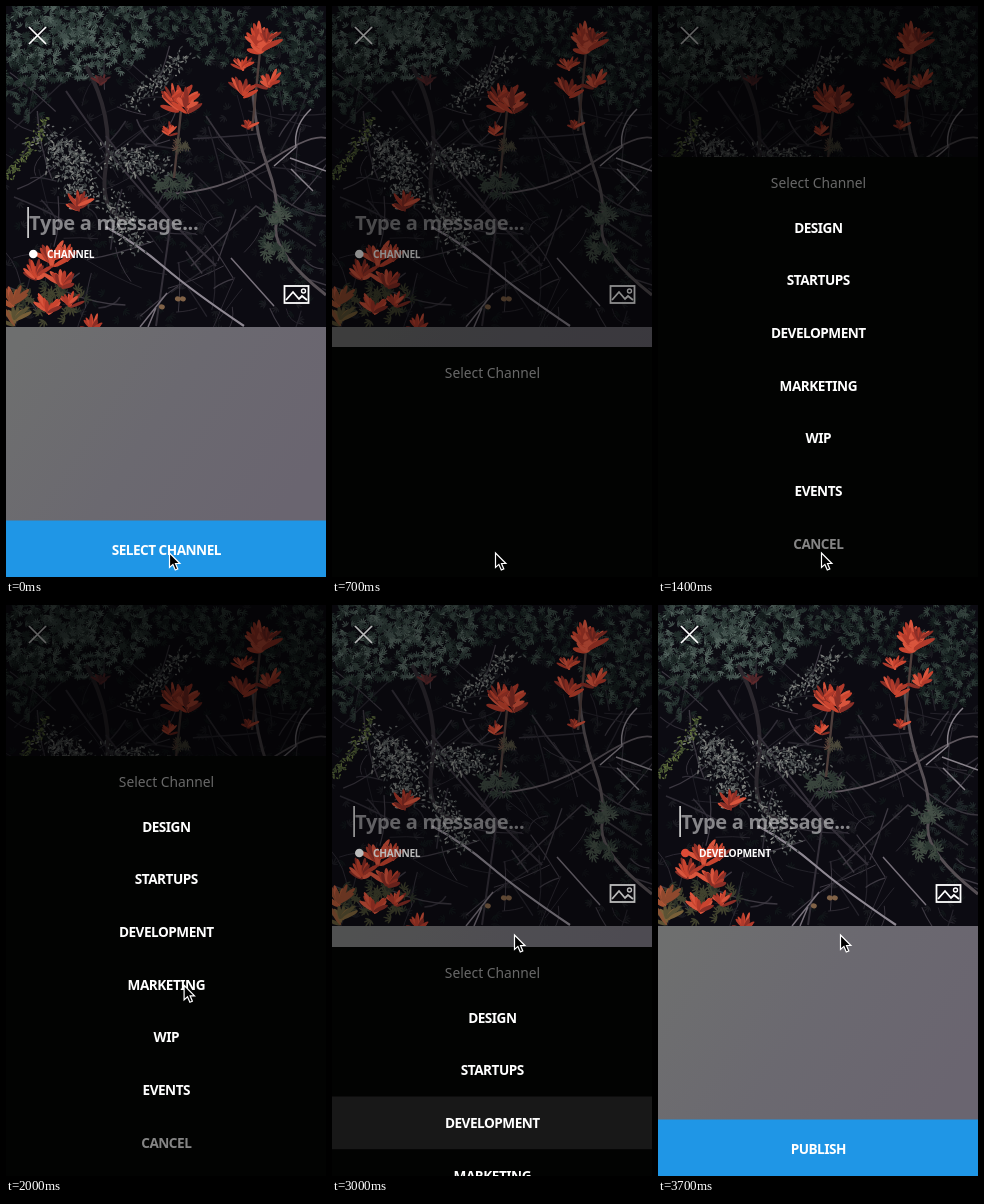
These frames come from a looping animation (320x571 px, 3.8 s). An HTML page with a canvas:

```html
<!DOCTYPE html>
<html lang="en">
<head>
<meta charset="utf-8">
<title>Select a channel</title>
<style>
  html, body { margin: 0; width: 100%; height: 100%; overflow: hidden; background: #000; }
  canvas, svg { position: absolute; left: 0; top: 0; display: block; }
  text { font-family: "Noto Sans", "Open Sans", sans-serif; fill: #fff; }
  .mid { text-anchor: middle; }
  .caps { font-weight: 600; font-size: 13.6px; letter-spacing: -.5px; }
  .small { font-weight: 600; font-size: 10.2px; letter-spacing: -.3px; }
  .hint { font-weight: 600; font-size: 20px; letter-spacing: -.3px; fill-opacity: .5; }
  .title { font-size: 13.8px; fill: #686868; }
  .line { fill: none; stroke: #fff; }
</style>
</head>
<body>
<canvas id="photo" width="320" height="321"></canvas>
<svg width="320" height="571" viewBox="0 0 320 571">
  <defs>
    <linearGradient id="haze" x1="0" y1=".2" x2="1" y2=".6">
      <stop offset="0" stop-color="#6e6f6f"/>
      <stop offset=".5" stop-color="#6b6970"/>
      <stop offset="1" stop-color="#6a6570"/>
    </linearGradient>
  </defs>

  <rect y="321" width="320" height="194" fill="url(#haze)"/>
  <path class="line" stroke-width="1.7" d="M23 21L40 38M40 21L23 38"/>
  <rect id="caret" x="21.3" y="201" width="1.6" height="31" fill="#ddd"/>
  <text class="hint" x="23" y="224">Type a message...</text>
  <circle id="dot" cx="27.3" cy="248" r="4.3"/>
  <text id="tag" class="small" x="41" y="251.6"></text>
  <g class="line" stroke-width="1.8">
    <rect x="278.5" y="280" width="24" height="17"/>
    <path d="M280 294l7-8 6 7 3-3 5 4"/>
    <circle cx="297.5" cy="285" r="2" stroke-width="1.4"/>
  </g>
  <rect y="514.5" width="320" height="56.5" fill="#1f96e6"/>
  <text id="action" class="caps mid" x="160.3" y="548.6"></text>

  <rect id="shade" width="320" height="571"/>
  <g id="panel">
    <rect width="320" height="420" fill="#020302"/>
    <rect id="row" y="149.5" width="320" height="52.7" fill="#181818"/>
    <text class="title mid" x="160.5" y="31">Select Channel</text>
    <g id="items"></g>
  </g>

  <g id="ring" fill="none">
    <circle r="21.5" stroke="#fff" stroke-width="6"/>
    <circle r="21.5" stroke="#151515" stroke-width="3.4"/>
  </g>
  <path id="cursor" d="M0 0V14.5L3.4 11.4L5.8 17L8.3 15.9L6 10.5H10.4Z" fill="#000" stroke="#fff" stroke-width="1.2"/>
</svg>

<script>
const LOOP = 3800, STEP = 100;
const $ = id => document.getElementById(id);

/* ---------- backdrop ---------- */
const ctx = $("photo").getContext("2d");
let seed = 7;
const rnd = () => (seed = (seed * 16807) % 2147483647) / 2147483647;
const pick = list => list[Math.floor(rnd() * list.length)];

function leaf(x, y, len, wide, angle, color) {
  ctx.fillStyle = color;
  ctx.beginPath();
  ctx.ellipse(x + Math.cos(angle) * len / 2, y + Math.sin(angle) * len / 2, len / 2, wide / 2, angle, 0, 7);
  ctx.fill();
}

// feathery leaves, thinning out towards the rim
function foliage(x, y, rx, ry, count, len, colors) {
  for (let i = 0; i < count; i++) {
    const a = rnd() * 6.283, r = Math.pow(rnd(), .7);
    const px = x + Math.cos(a) * r * rx, py = y + Math.sin(a) * r * ry;
    const turn = rnd() * 6.283, color = pick(colors);
    for (let k = -2; k <= 2; k++) leaf(px, py, len * (1 - Math.abs(k) * .15), len * .2, turn + k * .6, color);
  }
}

function twig(color, width, d) {
  ctx.strokeStyle = color;
  ctx.lineWidth = width;
  ctx.stroke(new Path2D(d));
}

function thicket(count) {
  for (let i = 0; i < count; i++) {
    const x = rnd() * 320, y = 70 + rnd() * 250, a = rnd() * 6.283, len = 20 + rnd() * 50;
    const dx = Math.cos(a) * len, dy = Math.sin(a) * len;
    twig(pick(["#25232b", "#302d36", "#3d3942"]), .6 + rnd(),
      `M${x} ${y}q${dx / 2 + rnd() * 14 - 7} ${dy / 2 + rnd() * 14 - 7} ${dx} ${dy}`);
  }
}

function spray(x1, y1, x2, y2, spread, count, colors) {
  for (let i = 0; i < count; i++) {
    const p = rnd(), off = (rnd() + rnd() - 1) * spread;
    leaf(x1 + (x2 - x1) * p + off, y1 + (y2 - y1) * p + (rnd() - .5) * spread,
      2 + rnd() * 3, 1.5, rnd() * 6.283, pick(colors));
  }
}

// ragged upright fan of thin petals
function flower(x, y, size, colors) {
  for (let i = 0; i < 11; i++) {
    const a = -Math.PI / 2 + (i - 5) * .23 + (rnd() - .5) * .3;
    leaf(x + (rnd() - .5) * 3, y - rnd() * size * .3, size * (.45 + rnd() * .4), size * .17, a, pick(colors));
  }
}

function paint() {
  const sage = ["#2c3a37", "#43524e", "#212c2a", "#566660", "#384743"];
  const moss = ["#1c2725", "#2b3835", "#151d1d", "#36443f"];
  const ash = ["#4c5152", "#696d6d", "#383c3e", "#858783", "#595d5c"];
  const red = ["#c9442f", "#b03a2b", "#d9553d", "#8b2f27"];

  ctx.fillStyle = "#0c0b12";
  ctx.fillRect(0, 0, 320, 321);
  foliage(160, 160, 220, 200, 420, 7, ["#121318", "#18191e", "#111619", "#1c1c22"]);
  thicket(110);
  foliage(65, 28, 80, 48, 520, 6, sage);
  foliage(20, 75, 30, 40, 90, 6, moss);
  foliage(160, 15, 60, 24, 120, 6, moss);
  foliage(290, 50, 42, 56, 230, 6, moss);
  foliage(215, 30, 35, 32, 70, 6, moss);
  foliage(295, 215, 30, 60, 60, 6, ["#171d1e", "#20282a"]);

  twig("#2c282e", 4, "M80 60Q108 110 100 160T125 215");
  twig("#343039", 2, "M60 85Q110 160 150 200T210 260M100 130L165 215L150 320");
  twig("#39353d", 1.6, "M200 110Q225 150 260 180T320 210M185 260L250 200L310 240");
  twig("#5d565d", 1.8, "M158 188Q215 187 260 157T320 132");
  twig("#564f54", 3, "M247 88Q250 130 262 162T270 220T320 289");
  twig("#89838b", 1.5, "M305 103Q287 120 290 141L268 160M285 163L307 185M284 152L320 165");
  twig("#8f8993", 2.2, "M100 221Q130 237 158 261T238 320");
  twig("#77707a", 1.5, "M134 321L161 287M142 321L150 302M225 252L268 300");

  spray(178, 48, 128, 98, 16, 150, ash);
  spray(40, 128, 84, 195, 24, 330, ash);
  spray(60, 140, 85, 165, 20, 110, ash);
  spray(108, 150, 155, 162, 24, 230, ash);
  spray(108, 190, 126, 242, 18, 150, ash);
  spray(42, 112, 2, 174, 7, 90, ["#56643a", "#414f31", "#65753e"]);
  foliage(268, 210, 13, 10, 16, 8, ["#39453e", "#465148"]);
  foliage(270, 243, 16, 14, 20, 8, ["#2e3a34", "#414c43"]);
  foliage(165, 178, 20, 12, 24, 8, ["#2d3833", "#3b463e"]);
  foliage(40, 295, 40, 24, 50, 8, ["#2d3329", "#42432f"]);

  twig("#4f3e3b", 2.4, "M175 105Q172 135 168 172M254 45L246 125");
  foliage(176, 141, 7, 6, 9, 6, ["#60483c", "#4d4a3c"]);
  [[255, 48, 30], [251, 40, 22], [262, 38, 18], [237, 65, 17], [238, 92, 25], [263, 84, 22],
   [243, 124, 14], [174, 106, 31], [182, 108, 25], [167, 96, 18], [163, 130, 14], [73, 206, 22],
   [46, 262, 29], [60, 256, 20], [30, 275, 24], [56, 283, 27], [42, 310, 25], [64, 303, 20], [86, 326, 18]]
    .forEach(f => flower(...f, red));
  flower(95, 80, 14, ["#602a2c", "#4a2529"]);
  flower(7, 302, 27, ["#a45232", "#8e492e", "#b5553a"]);
  flower(9, 320, 24, ["#796039", "#8a5435", "#5b5234"]);
  for (const [x, y] of [[156, 300], [172, 292], [177, 292]]) leaf(x - 3, y, 6, 5, .3, "#806247");
}
paint();

/* ---------- list ---------- */
const names = ["DESIGN", "STARTUPS", "DEVELOPMENT", "MARKETING", "WIP", "EVENTS", "CANCEL"];
const items = names.map((name, i) => {
  const el = document.createElementNS("http://www.w3.org/2000/svg", "text");
  el.setAttribute("class", "caps mid");
  el.setAttribute("x", 160.3);
  el.setAttribute("y", 75.5 + i * 52.67);
  el.textContent = name;
  if (name === "CANCEL") el.style.fill = "#858585";
  return $("items").appendChild(el);
});

/* ---------- motion ---------- */
const clamp = v => Math.min(1, Math.max(0, v));
const ease = p => p * p * (3 - 2 * p);

// linear track through [time, value] points
function track(points, t) {
  const i = points.findIndex(p => p[0] > t);
  if (i === 0) return points[0][1];
  if (i < 0) return points[points.length - 1][1];
  const [a, u] = points[i - 1], [b, v] = points[i];
  return u + (v - u) * (t - a) / (b - a);
}

const slide = [[500, 571], [600, 480], [700, 341], [800, 248], [900, 194], [1000, 166], [1100, 154], [1200, 151],
               [2700, 151], [2800, 175], [2900, 245], [3000, 342], [3100, 450], [3200, 535], [3300, 571]];
const dim = [[400, 0], [500, .04], [700, .45], [1000, .62], [2700, .62], [3000, .27], [3300, 0]];

function move(el, x, y, scale = 1) {
  el.setAttribute("transform", `translate(${x} ${y}) scale(${scale})`);
}

function render(t) {
  const done = t >= 3300;
  $("tag").textContent = done ? "DEVELOPMENT" : "CHANNEL";
  $("action").textContent = done ? "PUBLISH" : "SELECT CHANNEL";
  $("dot").setAttribute("fill", done ? "#dd4a36" : "#fff");
  $("caret").style.opacity = (t + 200) % 1000 < 500 || t >= 3600 ? 1 : 0;

  const y = track(slide, t);
  move($("panel"), 0, y);
  $("panel").style.visibility = y < 571 ? "visible" : "hidden";
  $("shade").style.opacity = track(dim, t);
  $("row").style.opacity = t >= 2400 ? 1 : 0;
  items.forEach((el, i) => el.style.opacity = clamp((t - 700 - i * 50) / 250));

  const p = ease(clamp((t - 1450) / 800));
  const cx = 163.5 + 19 * p, cy = 547 - 217 * p;
  move($("cursor"), cx, cy);

  const tap = t < 1000 ? t - 100 : t - 2400;
  const on = tap >= 0 && tap < 300;
  $("ring").style.opacity = on ? (tap < 200 ? 1 : .4) : 0;
  move($("ring"), cx + 1, cy + 2, .7 + Math.min(tap, 200) * .003);
}

const start = performance.now();
function tick() {
  const t = (performance.now() - start) % LOOP;
  render(Math.floor(t / STEP) * STEP);
  requestAnimationFrame(tick);
}
tick();
</script>
</body>
</html>
```
